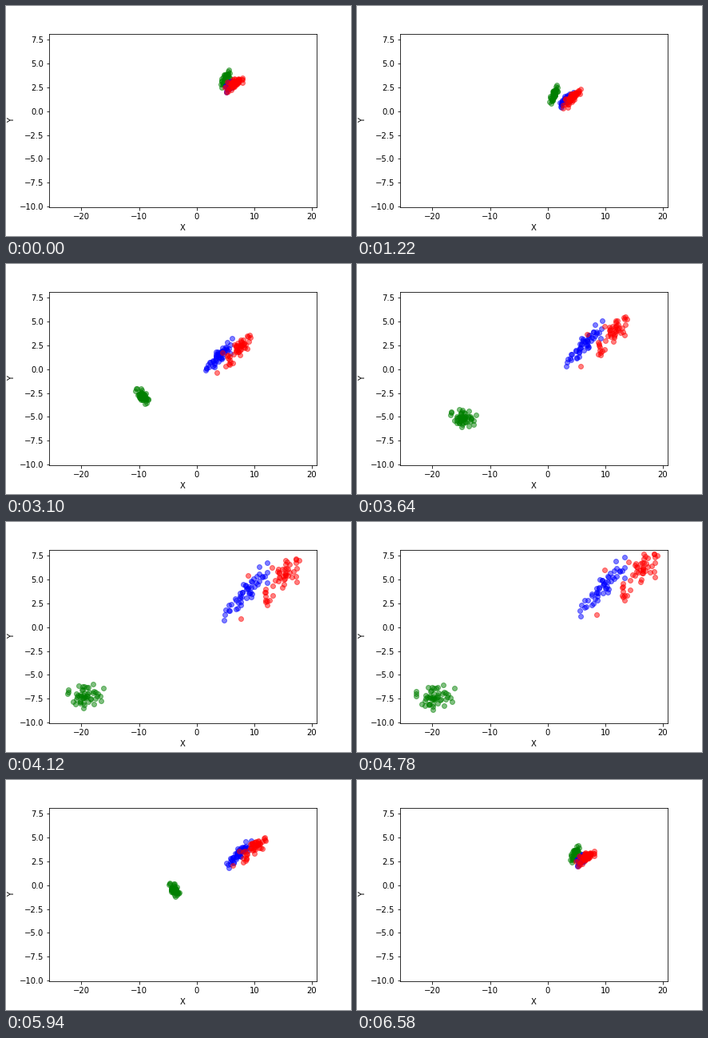
A matplotlib script that plays this animation: 432 px wide and 288 px high, repeating every 6.6 s.

```python
import numpy as np
import matplotlib.pyplot as plt
from matplotlib.animation import FuncAnimation

HOLD, MOVE = 10, 100
LEG = HOLD + MOVE
N = 50
XLIM, YLIM = (-25.61, 20.81), (-10.09, 8.15)

rng = np.random.default_rng(7)

# Principal axes of the four measurements, and how far each follows overall size
CENTRE = np.array([5.843, 3.057, 3.758, 1.199])
AXES = np.array([[0.3614, -0.0845, 0.8567, 0.3583],
                 [0.6566, 0.7302, -0.1734, -0.0755]])
SIZE = np.array([0.92, 0.7, 0.8, 0.5])


def normal(cols):
    """Standardised normal columns with short tails."""
    z = rng.standard_normal((N, cols))
    return np.clip((z - z.mean(0)) / z.std(0), -2.2, 2.2)


def measure(mean, std):
    """Four measurements that grow together, rounded to one decimal."""
    z = SIZE * normal(1) + np.sqrt(1 - SIZE**2) * normal(4)
    return np.round(mean + z * std, 1)


def project(feats):
    return (feats - CENTRE) @ AXES.T


# Place of each class in the third view, from its principal components u, v
def embed_green(u, v):
    a, b = normal(2).T
    return -22.1 - 3.8 * (v - 0.19) + 0.8 * a, -8.4 + 0.7 * b


def embed_blue(u, v):
    a, b = normal(2).T
    x = np.clip(10 + 3.3 * (u - 0.53) + 1.1 * a, 5.7, 14)
    return x, 4.4 + 0.5 * (x - 10) + v + 0.25 + 0.5 * b


def embed_red(u, v):
    a, b = normal(2).T
    tail = u < 1.6
    x = np.where(tail, 14 + 0.7 * a, 17.7 + 2 * (u - 2.45) + 0.9 * a)
    y = np.where(tail, 3.8 + 0.75 * b, 6.5 + v + 0.75 * b)
    return x, y


def build(embed, mean, std):
    """The three views of one class: raw, projected, embedded."""
    feats = measure(mean, std)
    pc = project(feats)
    x, y = embed(*pc.T)
    spread = np.c_[np.clip(x, *XLIM), np.clip(y, *YLIM)]
    return [feats[:, :2], pc, spread]


classes = {
    "green": build(embed_green, [5.01, 3.43, 1.46, 0.25], [0.35, 0.38, 0.17, 0.10]),
    "blue": build(embed_blue, [5.94, 2.77, 4.26, 1.33], [0.51, 0.31, 0.47, 0.20]),
    "red": build(embed_red, [6.59, 2.97, 5.55, 2.03], [0.63, 0.32, 0.55, 0.27]),
}

# Two red strays lie apart, among and below the blue cloud
raw, pcs, spread = classes["red"]
raw[:2] = (4.9, 2.5), (6.0, 2.2)
pcs[:2] = (0.52, -1.19), (1.30, -0.76)
spread[:2] = (8.9, 1.2), (10.2, 6.4)

fig, ax = plt.subplots(figsize=(6, 4), dpi=72)
fig.subplots_adjust(left=0.125, right=0.9, bottom=0.125, top=0.88)
ax.set(xlim=XLIM, ylim=YLIM, xlabel="X", ylabel="Y",
       xticks=np.arange(-20, 21, 10), yticks=np.arange(-10, 8, 2.5))

clouds = [(ax.scatter(*views[0].T, c=color, alpha=0.5), views)
          for color, views in classes.items()]


def update(frame):
    leg, step = divmod(frame, LEG)
    t = max(0, step - HOLD) / MOVE
    for dots, views in clouds:
        dots.set_offsets((1 - t) * views[leg] + t * views[(leg + 1) % 3])
    return [dots for dots, _ in clouds]


anim = FuncAnimation(fig, update, frames=3 * LEG, interval=20,
                     repeat=True, repeat_delay=0)
plt.show()
```
